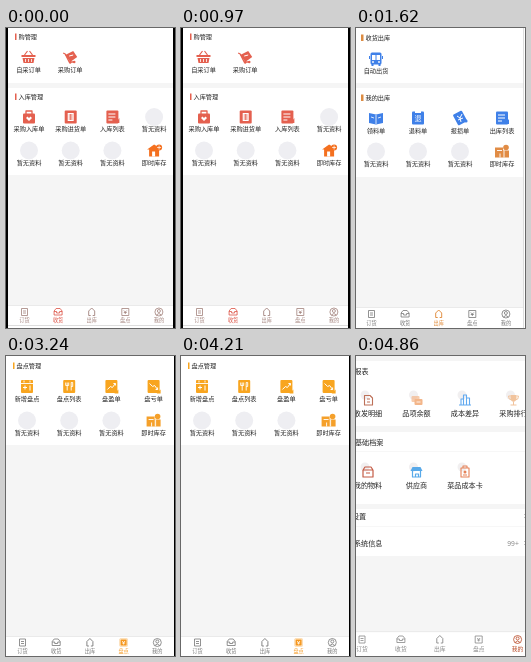
Animation of 169 by 300 pixels, one loop 6480 ms. Source, as an HTML page:

```html
<!DOCTYPE html>
<html>
<head>
<meta charset="utf-8">
<style>
html, body { margin: 0; width: 100%; height: 100%; overflow: hidden; background: #f5f5f5; }
svg { display: block; width: 100vw; height: 100vh; }
text { font-family: "Noto Sans CJK SC", "Noto Sans CJK", sans-serif; }
</style>
</head>
<body>
<svg id="stage" viewBox="0 0 169 300"></svg>
<script>
const rect = (x, y, w, h, fill, extra = '') =>
  `<rect x="${x}" y="${y}" width="${w}" height="${h}" fill="${fill}" ${extra}/>`;
const text = (s, x, y, size, fill = '#222', anchor = 'middle') =>
  `<text x="${x}" y="${y}" font-size="${size}" fill="${fill}" text-anchor="${anchor}">${s}</text>`;
const fill = (d, c) => `<path d="${d}" fill="${c}"/>`;
const line = (d, c, w = 1) =>
  `<path d="${d}" fill="none" stroke="${c}" stroke-width="${w}" stroke-linejoin="round"/>`;
const disc = (x, y, r, c) => `<circle cx="${x}" cy="${y}" r="${r}" fill="${c}"/>`;
const at = (x, y, body) => `<g transform="translate(${x} ${y})">${body}</g>`;
const white = (y, h) => rect(0, y, 169, h, '#fff');
const page = c => rect(-6, -6.5, 12, 13, c, 'rx="1"');

// Menu icons, centred on 0,0
const icons = {
  none: () => disc(0, 0, 9, '#eeeef2'),
  basket: c => fill('M-7-2H7V0H-7ZM-6 1H6L5 6H-5Z', c) + line('M-4-2L-1-6M4-2L1-6', c, 1.2) +
    line('M-3 2V5M0 2V5M3 2V5', '#fff', .8),
  cart: c => fill('M-5-2L3-6L7 0L0 5Z', c) + line('M-7-4L-5-3L-1 5H5', c, 1.3) +
    disc(0, 5.5, 1.2, c) + disc(4, 5, 1.2, c) + line('M-1-1L3-2', '#fff'),
  bag: c => rect(-6, -3.5, 12, 10, c, 'rx="1"') + line('M-3-3V-6H3V-3', c, 1.3) +
    fill('M0 4L-3 1L-1.5-.5L0 1L1.5-.5L3 1Z', '#fff'),
  clip: c => page(c) + rect(-3, -4, 6, 8, '#fff') + line('M-2-2H2M-2 0H2M-2 2H2M0-3V3', c, .8),
  list: c => page(c) + line('M-4-3H3M-4 0H3M-4 3H0', '#fff') + fill('M3 6L7 1V6Z', c),
  house: c => fill('M-7-1L0-6L5-3V6H-5V-1Z', c) + rect(-2, 1, 3, 5, '#fff') +
    disc(5, -3, 3, c) + line('M3-3H7M5-5V-1', '#fff', .7),
  bus: c => rect(-5.5, -6.5, 11, 12, c, 'rx="1.5"') + rect(-4, -4, 8, 5, '#fff') +
    line('M0-4V1', c) + rect(-4.5, 5, 2, 2, c) + rect(2.5, 5, 2, 2, c) +
    disc(-3, 3, .9, '#fff') + disc(3, 3, .9, '#fff') + line('M-6.5-3V0M6.5-3V0', c),
  book: c => fill('M-7-5L0-3.5L7-5V5L0 6.5L-7 5Z', c) + line('M0-3V6M-5-1L-2 0M5-1L2 0', '#fff', .8),
  back: c => page(c) + rect(-3, -7, 6, 2, '#fff') + text('退', 0, 3, 7, '#fff'),
  ticket: c => `<g transform="rotate(-28)">${rect(-5, -6, 10, 12, c, 'rx="1"')}</g>` +
    line('M-3-2L0 0L2-4M-2 2L3 0M0 0L1 4', '#fff') + disc(6, 3, 1.6, c),
  gift: c => rect(-7, -4, 8, 10, c) + rect(1, -1, 6, 7, c) + disc(4, -4, 2.8, c) +
    line('M-5-1H0M2-1V6M-2 2V6', '#fff', .9),
  add: c => page(c) + line('M-6-3H6M-3-6V-4M3-6V-4', '#fff', .9) + line('M-4 1H0M-2-1V3M3-1V4', '#fff'),
  fork: c => page(c) + line('M-2-4V4M-3.5-4V-1H-.5V-4M2-4V4M2-4H3.5V0H2', '#fff', .9),
  rise: c => page(c) + line('M-4 3L-1 0L1 1L4-3M2-3H4V-1', '#fff') + fill('M3 7L7 3V7Z', c),
  fall: c => page(c) + line('M-4-3L-1 0L1-1L4 3M2 3H4V1', '#fff') + fill('M3 7L7 3V7Z', c),
  // outlined set
  sheet: c => line('M-3.5-4.5H2L4.5-2V5H-3.5ZM-1-1H2M-1 2H2', c, 1.1),
  stack: c => rect(-5, -4, 8, 6, c, 'rx="1" opacity=".7"') + rect(-2, -1, 8, 6, c, 'rx="1"') +
    line('M0 2H4', '#fff', .8),
  bars: c => line('M-4 5V-1H-1.5V5M-1.5 5V-5H1.5V5M1.5 5V-2H4.5V5M-6 5H6', c, 1.1),
  cup: c => fill('M-3-5H3V-1Q2 2 0 2Q-2 2-3-1Z', c) + line('M-3-4H-5Q-5 0-2 0M3-4H5Q5 0 2 0M0 2V5M-3 5H3', c),
  crate: c => line('M-5-2H5V5H-5ZM-5-2L-3-5H3L5-2M-2 1H2', c, 1.2),
  shop: c => fill('M-4-5H4L6-1H-6Z', c) + line('M-4-1V5H4V-1M-1 5V2H2V5', c, 1.2),
  card: c => line('M-4-4H4V5H-4ZM-2-4V-6H2V-4M-2 3H2', c, 1.1) + disc(0, 0, 1.5, c)
};

// Tab bar icons
const tabs = [
  ['订货', c => line('M-3-3.5H3V3.5H-3ZM-1.5-1H1.5M-1.5 1H1.5', c, .8)],
  ['收货', c => line('M-4-1L-2-3.5H2L4-1V3H-4ZM-4-.5H-1.5V1H1.5V-.5H4', c, .8)],
  ['出库', c => line('M-3 3.5V-1L0-4L3-1V3.5H1M-3 3.5H-1', c, .9)],
  ['盘点', c => line('M-3.5-3.5H3.5V3.5H-3.5ZM-1.5-1.5L0 0L1.5-1.5M0 0V2M-1.5 .5H1.5', c, .8)],
  ['我的', c => line('M-4 0A4 4 0 1 1 4 0A4 4 0 1 1-4 0M-1.5-1A1.5 1.5 0 1 1 1.5-1A1.5 1.5 0 1 1-1.5-1M-2.5 3Q0 0 2.5 3', c, .8)]
];

function tabBar(top, x0, step, iconY, labelY, active, color, idle, size = 5.2) {
  return rect(0, top, 169, 300 - top, '#fff') + rect(0, top, 169, .6, '#ddd') +
    tabs.map(([name, icon], i) => {
      const c = i === active ? color : idle, x = x0 + i * step;
      const on = i === active && i === 3;
      const mark = on ? rect(-4, -4, 8, 8, c, 'rx="1"') + icon('#fff') : icon(c);
      return at(x, iconY, mark) + text(name, x, labelY, size, c);
    }).join('');
}

const title = (s, x, y, c, w = 1.5) =>
  rect(x, y - 5.8, w, 6.5, c) + text(s, x + w + 2, y, 6.2, '#222', 'start');

// items: [icon, label, colour?]
const row = (items, x0, step, iconY, labelY, c, size = 6.2) =>
  items.map(([icon, label = '暂无资料', own = c], i) =>
    at(x0 + i * step, iconY, icons[icon](own)) + text(label, x0 + i * step, labelY, size)).join('');

const halo = (x0, step, n, y) =>
  Array.from({ length: n }, (_, i) => disc(x0 + i * step - 3, y - 4, 4.5, '#f1eff0')).join('');

const empty = ['none'];
const red = '#e4604f', blue = '#3f80e8', amber = '#f8a51f', rust = '#b94a26';

const scenes = [
  white(0, 55) + title('购管理', 9, 11.3, red) +
  row([['basket', '自采订单'], ['cart', '采购订单']], 22.5, 41.7, 29, 44, red) +
  white(60, 87) + title('入库管理', 9, 71.3, red) +
  row([['bag', '采购入库单'], ['clip', '采购进货单'], ['list', '入库列表'], empty], 23, 41.7, 89, 103.3, red) +
  row([empty, empty, empty, ['house', '即时库存', '#f4701f']], 23, 41.7, 122.5, 136.5, red) +
  tabBar(277, 18.5, 33.6, 284, 294, 1, '#dc5244', '#a2827c') +
  rect(0, 297, 169, 1, '#ddd') + rect(0, 0, 2, 300, '#000') + rect(167, 0, 2, 300, '#000'),

  white(0, 55) + title('收货出库', 5, 12.3, '#dc8b42', 2.5) +
  row([['bus', '自动出货']], 20, 42, 31, 45.3, blue) +
  white(60, 89) + title('我的出库', 5, 72.3, '#dc8b42', 2.5) +
  row([['book', '领料单'], ['back', '退料单'], ['ticket', '报损单'], ['list', '出库列表']], 20, 42, 90, 104.5, blue) +
  row([empty, empty, empty, ['gift', '即时库存', '#e18c45']], 20, 42, 123.5, 138, blue) +
  tabBar(279, 15.5, 33.6, 286, 296.5, 2, '#df852f', '#777') +
  rect(167, 0, .8, 300, '#ccc') + rect(167.8, 0, 1.2, 300, '#fff'),

  white(0, 89) + title('盘点管理', 7, 12.3, amber) +
  row([['add', '新增盘点'], ['fork', '盘点列表'], ['rise', '盘盈单'], ['fall', '盘亏单']], 21, 42.2, 30.5, 45.3, amber) +
  row([empty, empty, empty, ['gift', '即时库存', '#f5a02a']], 21, 42.2, 64.5, 79, amber) +
  tabBar(280, 16.5, 33.7, 286.5, 297, 3, '#f5971d', '#777') +
  rect(168, 0, 1, 300, '#000'),

  white(5, 65) + text('报表', -1.5, 17.5, 7, '#222', 'start') +
  halo(12, 48.5, 4, 43) +
  row([['sheet', '收发明细', '#bd7058'], ['stack', '品项余额', '#f3b68a'], ['bars', '成本差异', '#62aaf0'],
    ['cup', '采购排行', '#f1c39c']], 12, 48.5, 44, 60, rust, 7.1) +
  white(76, 72) + rect(0, 95, 169, .5, '#eee') + text('基础档案', -1, 88.7, 7.1, '#222', 'start') +
  halo(12, 48.5, 3, 115) +
  row([['crate', '我的物料', '#c45b45'], ['shop', '供应商', '#58a9e9'], ['card', '菜品成本卡', '#e58258']],
    12, 48.5, 116, 131.8, rust, 7.1) +
  white(153, 47) + rect(0, 170, 169, .5, '#eee') + text('设置', -4, 162.8, 7.1, '#222', 'start') +
  text('系统信息', -2, 190, 7.1, '#222', 'start') + text('99+', 157, 190, 7, '#888') +
  line('M168 158L170 160L168 162M168 185L170 187L168 189', '#aaa', .7) +
  tabBar(275.5, 6, 38.9, 283.5, 295, 4, rust, '#888', 5.8)
];

const stage = document.getElementById('stage');
stage.innerHTML = scenes.map(s => `<g>${rect(0, 0, 169, 300, '#f5f5f5')}${s}</g>`).join('');
const layers = [...stage.children];
const HOLD = 1620;

function draw(now) {
  const current = Math.floor(now / HOLD) % layers.length;
  layers.forEach((g, i) => g.setAttribute('display', i === current ? 'inline' : 'none'));
}
const start = performance.now();
function tick() {
  draw(performance.now() - start);
  requestAnimationFrame(tick);
}
tick();
</script>
</body>
</html>
```
